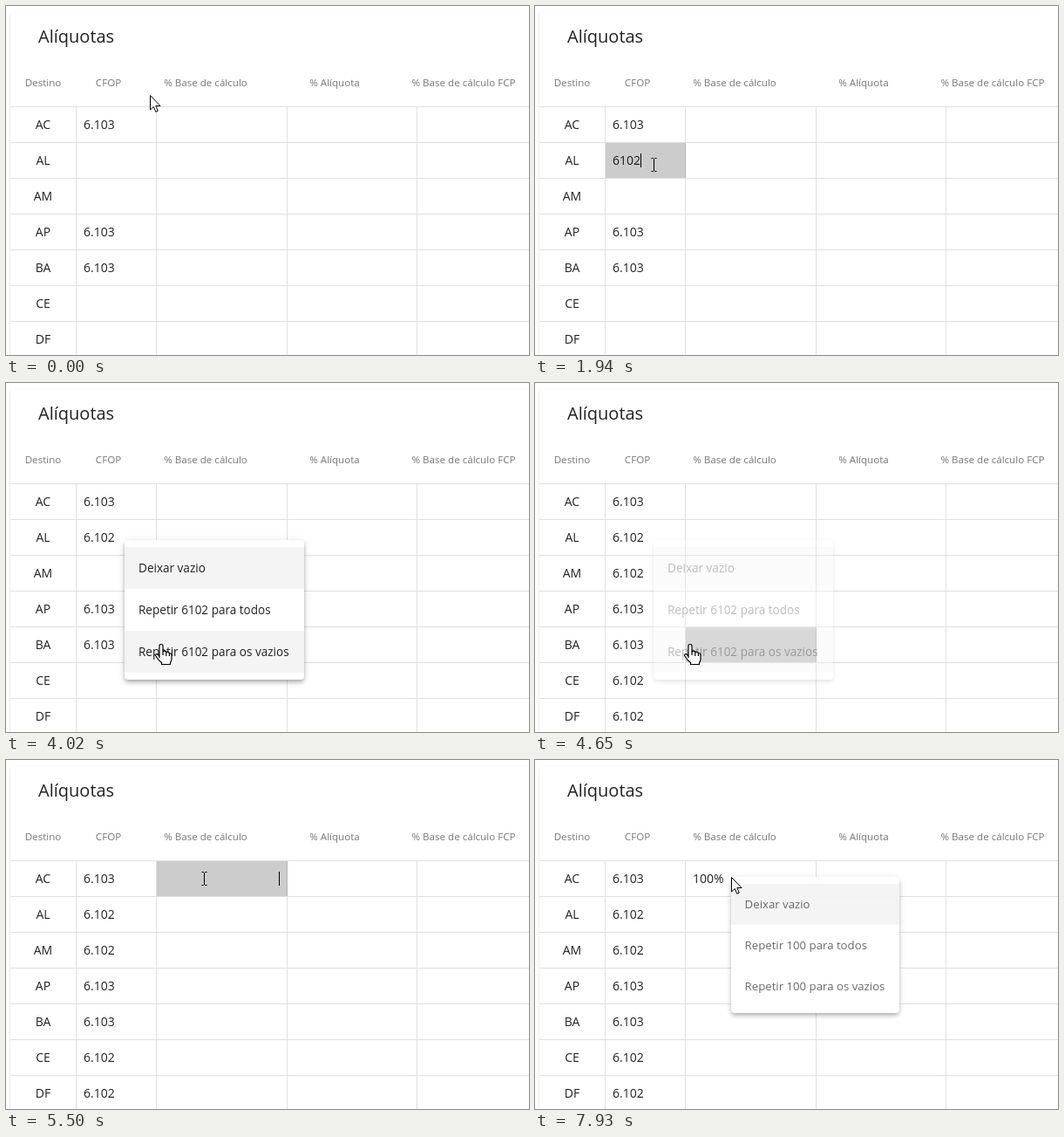
An HTML page for the animation above (8 s loop, 600x400 px).

```html
<!DOCTYPE html>
<html lang="pt-BR">
<head>
<meta charset="utf-8">
<title>Alíquotas</title>
<style>
  html, body { margin: 0; width: 100%; height: 100%; overflow: hidden; background: #fff; }
  body { position: relative; font-family: "Open Sans", "Noto Sans", sans-serif; color: rgba(0, 0, 0, .87); }
  svg { position: absolute; left: 0; top: 0; }
  text { font-size: 14px; fill: rgba(0, 0, 0, .87); }
  .title { font-size: 20px; }
  .head { font-size: 11.6px; fill: rgba(0, 0, 0, .54); }
  .mid { text-anchor: middle; }
  #card {
    position: absolute; left: 5px; top: 7px; width: 640px; height: 440px; border-radius: 4px; background: #fff;
    box-shadow: 0 2px 1px -1px rgba(0,0,0,.2), 0 1px 1px rgba(0,0,0,.14), 0 1px 3px rgba(0,0,0,.12);
  }
  #menu {
    position: absolute; padding: 8px 0; border-radius: 4px; background: #fff; transform-origin: 0 0;
    box-shadow: 0 2px 4px -1px rgba(0,0,0,.2), 0 4px 5px rgba(0,0,0,.14), 0 1px 10px rgba(0,0,0,.12);
  }
  #menu div { height: 48px; padding-left: 16px; font-size: 13.55px; line-height: 48px; white-space: nowrap; }
</style>
</head>
<body>
<div id="card"></div>
<svg id="table" width="600" height="400"></svg>
<div id="menu"><div><span></span></div><div><span></span></div><div><span></span></div></div>
<svg width="600" height="400">
  <g id="pointer" stroke="#000" fill="#fff" stroke-linejoin="round">
    <path id="arrow" d="M.5 .5V17L4.3 13.4 6.8 19.3 9.3 18.2 6.8 12.5H12Z"/>
    <path id="hand" stroke-width="1.2" d="M-2 16V2.2Q-2 .5 0 .5T2 2.2V9Q3 7.8 4.4 8.2T5.8 9.8Q7 8.8 8.2 9.4T9.4 11Q10.6 10.4 11.4 11.2T12 13.5V17Q12 19.5 10.5 21.5V23.5H.5V21.5Q-3 19 -6.5 13.5Q-6.8 12 -5.2 11.6T-2 14.5M2 9V13M5.8 9.8V14M9.4 11V14"/>
    <path id="beam" transform="translate(.5 1.5)" fill="none" d="M-3 -7H-1L0 -6 1 -7H3M-3 8H-1L0 7 1 8H3M0 -6V7"/>
  </g>
</svg>
<script>
const LOOP = 8000, TICK = 76;
const EDIT1 = 912, DONE1 = 2790, PICK = 4500, EDIT2 = 5492, DONE2 = 7760;
const $ = id => document.getElementById(id);

// The screen refreshes in bursts, one tick apart.
const bursts = [0, 380, 1490, 1710, 1860, 2490, DONE1, 3640, PICK, 5340, 6030, 6430, 6810, 7040, 7590, DONE2];

// time, x, y of the pointer
const path = [
  [304, 165, 102], [EDIT1, 136, 180], [3170, 136, 180], [3570, 171, 257], [4020, 178, 299],
  [4650, 178, 299], [4956, 208, 226], [5260, 220, 142], [5340, 226, 122], [EDIT2, 227, 134],
  [DONE2 - 10, 227, 134], [DONE2, 225, 134]
];

// time, input text, caret x
const typing = [
  [EDIT1, "", 89], [1710, "61", 105], [1860, "610", 113], [1936, "6102", 121],
  [EDIT2, "", 313], [6106, "0,01 %", 298], [6258, "0,10 %", 298], [6430, "1,00 %", 298],
  [6810, "10,00 %", 298], [7040, "100,00 %", 298]
];

const menus = [
  { x: 136, y: 180, width: 206, value: 6102, open: 2983 },
  { x: 225, y: 134, width: 198, value: 100, open: 7837 }
];

const states = ["AC", "AL", "AM", "AP", "BA", "CE", "DF"];
const preset = ["AC", "AP", "BA"];
const heads = [["Destino", 42.5], ["CFOP", 117.5], ["% Base de cálculo", 229], ["% Alíquota", 377], ["% Base de cálculo FCP", 525]];

const rowTop = i => 115 + 41 * i;
const text = (x, y, str, cls = "", id = "") => `<text id="${id}" class="${cls}" x="${x}" y="${y}">${str}</text>`;
const line = (x, y, w, h) => `<rect x="${x}" y="${y}" width="${w}" height="${h}" fill="#e0e0e0"/>`;

$("table").innerHTML =
  text(37, 42, "Alíquotas", "title") +
  heads.map(([str, x]) => text(x, 92, str, "head mid")).join("") +
  [80, 172, 322, 471].map(x => line(x, 115, 1, 285)).join("") +
  states.map((s, i) => line(5, rowTop(i), 595, 1)).join("") +
  `<rect id="hover" height="40" fill-opacity=".2"/>` +
  states.map((s, i) => text(42.5, rowTop(i) + 26, s, "mid") + text(89, rowTop(i) + 26, "", "", s)).join("") +
  text(181, 141, "", "", "base") + text(313, 141, "", "", "entry") +
  `<rect id="caret" width="1" height="16"/>`;
$("entry").style.textAnchor = "end";

const show = (el, on) => { el.style.display = on ? "" : "none"; };
const set = (el, attrs) => { for (const k in attrs) el.setAttribute(k, attrs[k]); };

function pointerAt(t) {
  const i = path.findIndex(p => p[0] > t);
  if (i < 0) return path.at(-1).slice(1);
  if (!i) return path[0].slice(1);
  const a = path[i - 1], b = path[i], u = (t - a[0]) / (b[0] - a[0]);
  return [1, 2].map(k => Math.round(a[k] + (b[k] - a[k]) * u));
}

function drawHover(t, quiet) {
  const [x, y] = pointerAt(t - TICK);   // the highlight trails the pointer
  const second = x > 172;
  show($("hover"), !quiet && y > 115);
  set($("hover"), { x: second ? 173 : 81, width: second ? 150 : 92, y: rowTop(Math.floor((y - 115) / 41)) + 1 });
}

function drawValues(t, editing) {
  const [since, str, caretX] = typing.findLast(k => k[0] <= t) || [0, "", 0];
  const first = t < DONE1;
  for (const s of states) {
    const filled = t >= PICK || (s === "AL" && t >= DONE1);
    $(s).textContent = preset.includes(s) ? "6.103" : filled ? "6.102" : "";
  }
  if (editing && first) $("AL").textContent = str;
  $("entry").textContent = editing && !first ? str : "";
  $("base").textContent = t >= DONE2 ? "100%" : "";
  show($("caret"), editing && (t - since) % 1070 < 535);
  set($("caret"), { x: caretX, y: first ? 169 : 128 });
}

function drawMenu(t, y) {
  const m = menus[t < PICK + 300 ? 0 : 1], menu = $("menu");
  const u = Math.min(1, (t - m.open) / 150);
  const fade = m === menus[0] && t >= PICK ? 1 - (t - PICK + 30) / 150 : 1;
  show(menu, u > 0 && fade > 0);
  const scale = 1 - .2 * (1 - u) ** 3;
  Object.assign(menu.style, {
    left: m.x + "px", top: m.y + "px", width: m.width + "px",
    transform: `scale(${scale})`, opacity: Math.min(1, u * 1.9) * fade
  });
  const labels = ["Deixar vazio", `Repetir ${m.value} para todos`, `Repetir ${m.value} para os vazios`];
  const over = Math.floor((y - m.y - 8) / 48);
  [...menu.children].forEach((item, i) => {
    item.style.background = i === 0 || i === over ? "#f4f4f4" : "";
    item.firstChild.textContent = labels[i];
    item.firstChild.style.opacity = Math.sqrt(Math.max(0, u));
  });
}

function draw(time) {
  const raw = Math.min(time % LOOP, 7930);
  const start = bursts.findLast(b => b <= raw);
  const t = start + Math.floor((raw - start) / TICK) * TICK;
  const quiet = (t >= DONE1 && t < PICK) || t >= DONE2;
  const editing = (t >= EDIT1 && t < DONE1) || (t >= EDIT2 && t < DONE2);
  const [x, y] = pointerAt(t);

  drawHover(t, quiet);
  drawValues(t, editing);
  drawMenu(t, y);

  const kind = editing ? "beam" : y < (quiet ? 188 : 116) ? "arrow" : "hand";
  for (const k of ["arrow", "hand", "beam"]) show($(k), k === kind);
  set($("pointer"), { transform: `translate(${x} ${y})` });
}

let origin;
function frame(now) {
  origin ??= now;
  draw(now - origin);
  requestAnimationFrame(frame);
}
draw(0);
requestAnimationFrame(frame);
</script>
</body>
</html>
```
